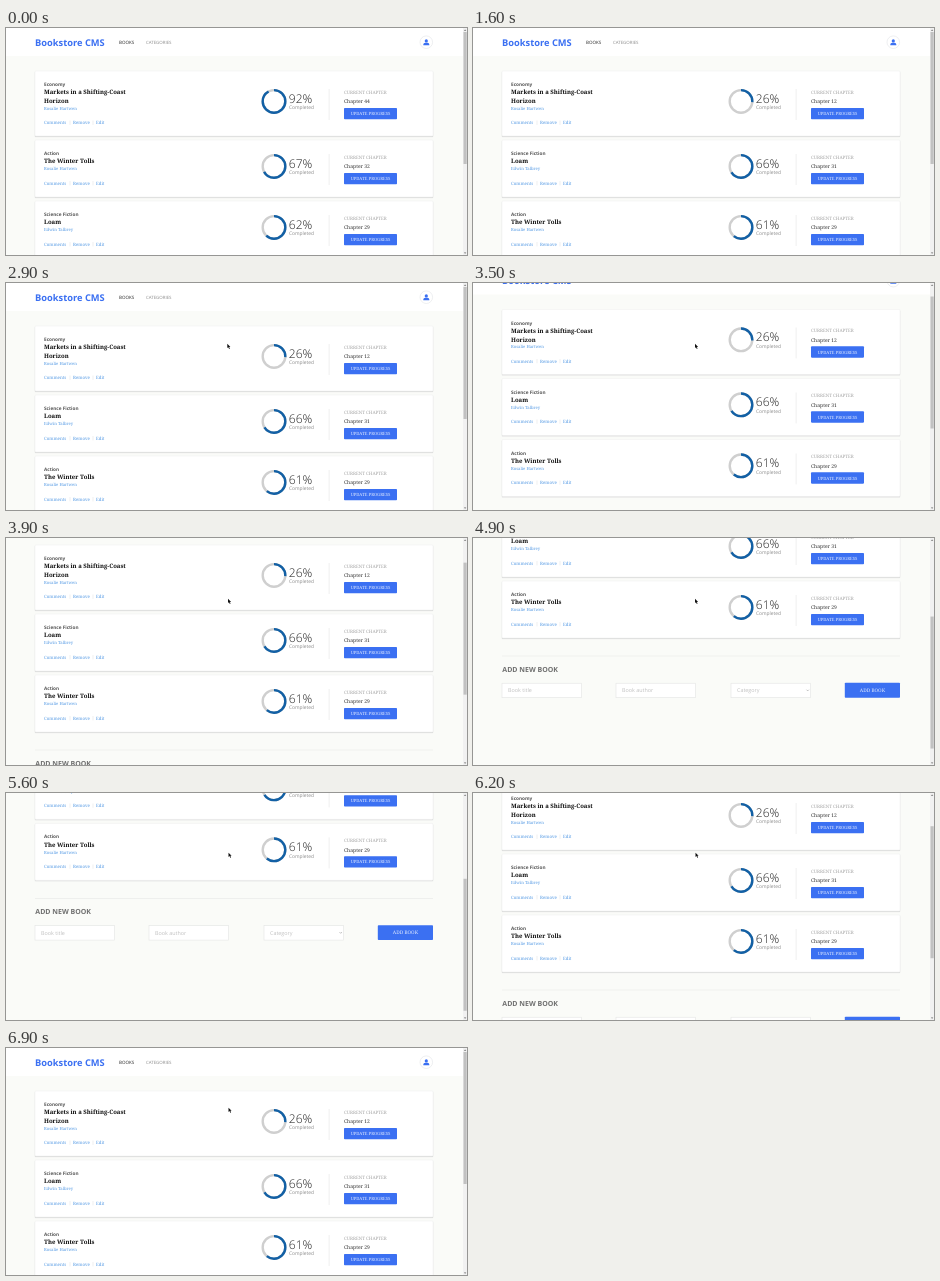
Animation, 461 px wide and 227 px high, one loop 8000 ms. Source, as an HTML page:

```html
<!DOCTYPE html>
<html lang="en">
<head>
<meta charset="utf-8">
<title>Bookstore CMS</title>
<style>
  html, body { margin: 0; width: 100%; height: 100%; overflow: hidden; background: #fafbf8; }
  svg { display: block; width: 100%; height: 100%; }
  text { font-family: "Open Sans", "Noto Sans", sans-serif; text-rendering: geometricPrecision; white-space: pre; }
  .slab { font-family: "Noto Serif", "Liberation Serif", serif; }
</style>
</head>
<body>
<svg id="stage" viewBox="0 0 461 227" xmlns="http://www.w3.org/2000/svg"></svg>
<script>
const LOOP = 8000;
const STEP = 100;
const MAX_SCROLL = 150;
const VIEW = { top: 4, bottom: 222 };
const THUMB = 132;
const BLUE = "#3b70f2";
const LINK = "#559ae4";
const PAGE = "#fafbf8";
const LIST_TOP = 43;
const stage = document.getElementById("stage");

function add(parent, tag, attrs = {}, content) {
  const node = document.createElementNS("http://www.w3.org/2000/svg", tag);
  for (const [key, value] of Object.entries(attrs)) node.setAttribute(key, value);
  if (content !== undefined) node.textContent = content;
  parent.append(node);
  return node;
}

const rect = (parent, x, y, width, height, fill, more = {}) =>
  add(parent, "rect", { x, y, width, height, fill, ...more });

// Text is placed by its left edge and the middle of its capitals.
const label = (parent, x, middle, size, fill, content, more = {}) =>
  add(parent, "text", { x, y: middle + size * 0.36, "font-size": size, fill, ...more }, content);

const slab = (parent, x, middle, size, fill, content, more = {}) =>
  label(parent, x, middle, size, fill, content, { class: "slab", ...more });

function button(parent, x, y, width, height, size, content) {
  rect(parent, x, y, width, height, BLUE, { rx: 0.8 });
  slab(parent, x + width / 2, y + height / 2, size, "#e4ecff", content, { "text-anchor": "middle" });
}

function header(parent) {
  rect(parent, 0, 0, 457, 28, "#fff");
  label(parent, 29, 14.2, 9.3, BLUE, "Bookstore CMS", { "font-weight": 700 });
  label(parent, 113, 14, 4.5, "#222", "BOOKS");
  label(parent, 140, 14, 4.4, "#888", "CATEGORIES");
  add(parent, "circle", { cx: 420.3, cy: 14.2, r: 6.3, fill: "#fff", stroke: "#e3e5e8", "stroke-width": 0.6 });
  add(parent, "circle", { cx: 420.3, cy: 12.9, r: 1.6, fill: BLUE });
  add(parent, "path", { d: "M417.3 17.3v-.7q0-1.7 2-1.9h2q2 .2 2 1.9v.7z", fill: BLUE });
}

function ring(parent, cx, cy, percent) {
  const circle = { cx, cy, r: 11.3, fill: "none", "stroke-width": 2.4 };
  add(parent, "circle", { ...circle, stroke: "#cfcfcf" });
  add(parent, "circle", {
    ...circle, stroke: "#1260a5", pathLength: 100,
    "stroke-dasharray": `${percent} 100`, transform: `rotate(-90 ${cx} ${cy})`
  });
}

function card(parent, top, book, percent, chapter) {
  const twoLines = book.title.length > 1;
  const height = twoLines ? 65 : 57;
  const g = add(parent, "g", { transform: `translate(0 ${top})` });
  rect(g, 28.6, 0.8, 398.8, height + 0.4, "#e9eae9", { rx: 1 });
  rect(g, 29, height - 0.4, 398, 1, "#d3d4d3");
  rect(g, 29, 0, 398, height, "#fff", { rx: 0.8, stroke: "#eceded", "stroke-width": 0.5 });

  label(g, 38, 13.4, 4.7, "#555", book.category, { "font-weight": 700 });
  book.title.forEach((line, i) =>
    slab(g, 38, 21.3 + i * 8.7, 6, "#111", line, { "font-weight": 700 }));
  const shift = twoLines ? 8.5 : 0;
  slab(g, 38, 28.8 + shift, 4.2, LINK, book.author);
  const linksY = 43.2 + shift;
  [[38, "Comments"], [67, "Remove"], [90, "Edit"]].forEach(([x, name]) =>
    slab(g, x, linksY, 4.4, LINK, name));
  [64, 87].forEach(x => rect(g, x - 0.2, linksY - 2.2, 0.4, 4.4, "#d8d8d8"));

  const side = add(g, "g", { transform: `translate(0 ${twoLines ? 4 : 0})` });
  ring(side, 268, 26.4, percent);
  label(side, 282.8, 23.2, 12, "#222", percent + "%", { "font-weight": 300 });
  label(side, 283, 32.6, 4.9, "#8c8c8c", "Completed");
  rect(side, 322.8, 14, 0.5, 31, "#dedede");
  slab(side, 338, 17.2, 4.5, "#a4a4a4", "CURRENT CHAPTER");
  slab(side, 338, 26.5, 5, "#333", "Chapter " + chapter);
  button(side, 338, 32.9, 53, 11.3, 4.3, "UPDATE PROGRESS");
  return top + height + 4;
}

function list(parent, entries) {
  const g = add(parent, "g");
  entries.reduce((top, entry) => card(g, top, ...entry), LIST_TOP);
  return g;
}

function form(parent) {
  const g = add(parent, "g");
  rect(g, 29, 247.7, 398, 0.6, "#e6e7e6");
  label(g, 29.3, 261.4, 7, "#707070", "ADD NEW BOOK", { "font-weight": 700 });
  [[29, "Book title"], [143, "Book author"], [258, "Category"]].forEach(([x, hint]) => {
    rect(g, x, 275.2, 79.5, 14.5, "#fff", { stroke: "#e3e4e3", "stroke-width": 0.6 });
    label(g, x + 6, 282.4, 5.4, "#c0c0c0", hint);
  });
  add(g, "path", { d: "M333.5 281.7l1.2 1.2 1.2-1.2", fill: "none", stroke: "#999", "stroke-width": 0.6 });
  button(g, 371.8, 274.8, 55.2, 14.9, 4.8, "ADD BOOK");
  return g;
}

function scrollbar(parent) {
  rect(parent, 457, 0, 4, 227, "#f1f1f1");
  add(parent, "path", { d: "M457.9 2.8l1.2-1.4 1.2 1.4zM457.9 224.4l1.2 1.4 1.2-1.4z", fill: "#666" });
  return rect(parent, 457.5, VIEW.top, 3.2, THUMB, "#c1c1c1");
}

const economy = { category: "Economy", title: ["Markets in a Shifting-Coast", "Horizon"], author: "Rosalie Hartwen" };
const action = { category: "Action", title: ["The Winter Tolls"], author: "Rosalie Hartwen" };
const fiction = { category: "Science Fiction", title: ["Loam"], author: "Edwin Talbrey" };

rect(stage, 0, 0, 461, 227, PAGE);
const page = add(stage, "g");
header(page);
const before = list(page, [[economy, 92, 44], [action, 67, 32], [fiction, 62, 29]]);
const after = list(page, [[economy, 26, 12], [fiction, 66, 31], [action, 61, 29]]);
const addBook = form(page);
const thumb = scrollbar(stage);
const pointer = add(stage, "path", {
  d: "M0 0v4.3l1-.9.8 1.7.8-.4-.8-1.6h1.3z",
  fill: "#111", stroke: "#fff", "stroke-width": 0.4, "paint-order": "stroke"
});

// Keys are [time, ...values]; values run linearly between them.
const scrollKeys = [[3100, 0], [3200, 2], [3900, 36], [4400, 82], [4900, 130], [5200, 150],
  [5500, 150], [5600, 142.6], [6200, 51], [6500, 18], [6900, 0]];
const pointerKeys = [[2400, 64, 18], [2500, 135, 100], [2600, 210, 180], [2700, 272, 150],
  [2800, 248, 88], [2900, 221.3, 60.8], [3200, 222, 60.8], [5500, 222, 60.8], [5600, 222.5, 59.7]];

function sample(keys, t) {
  const next = keys.findIndex(key => key[0] > t);
  if (next === 0) return keys[0].slice(1);
  if (next < 0) return keys[keys.length - 1].slice(1);
  const a = keys[next - 1], b = keys[next];
  const part = (t - a[0]) / (b[0] - a[0]);
  return a.slice(1).map((value, i) => value + (b[i + 1] - value) * part);
}

const show = (node, visible) => node.setAttribute("display", visible ? "inline" : "none");

function render(time) {
  const t = Math.floor((time % LOOP) / STEP) * STEP;
  const loading = t >= 1100 && t < 1600;
  const [scroll] = sample(scrollKeys, t);
  const [x, y] = sample(pointerKeys, t);
  show(before, t < 1100);
  show(after, t >= 1600);
  show(pointer, t >= 2400);
  addBook.setAttribute("transform", `translate(0 ${loading ? -191 : 0})`);
  page.setAttribute("transform", `translate(0 ${-scroll})`);
  pointer.setAttribute("transform", `translate(${x} ${y})`);
  const track = VIEW.bottom - VIEW.top;
  thumb.setAttribute("y", VIEW.top + (track - THUMB) * scroll / MAX_SCROLL);
  thumb.setAttribute("height", loading ? track : THUMB);
}

const start = performance.now();
function tick() {
  render(performance.now() - start);
  requestAnimationFrame(tick);
}
tick();
</script>
</body>
</html>
```
